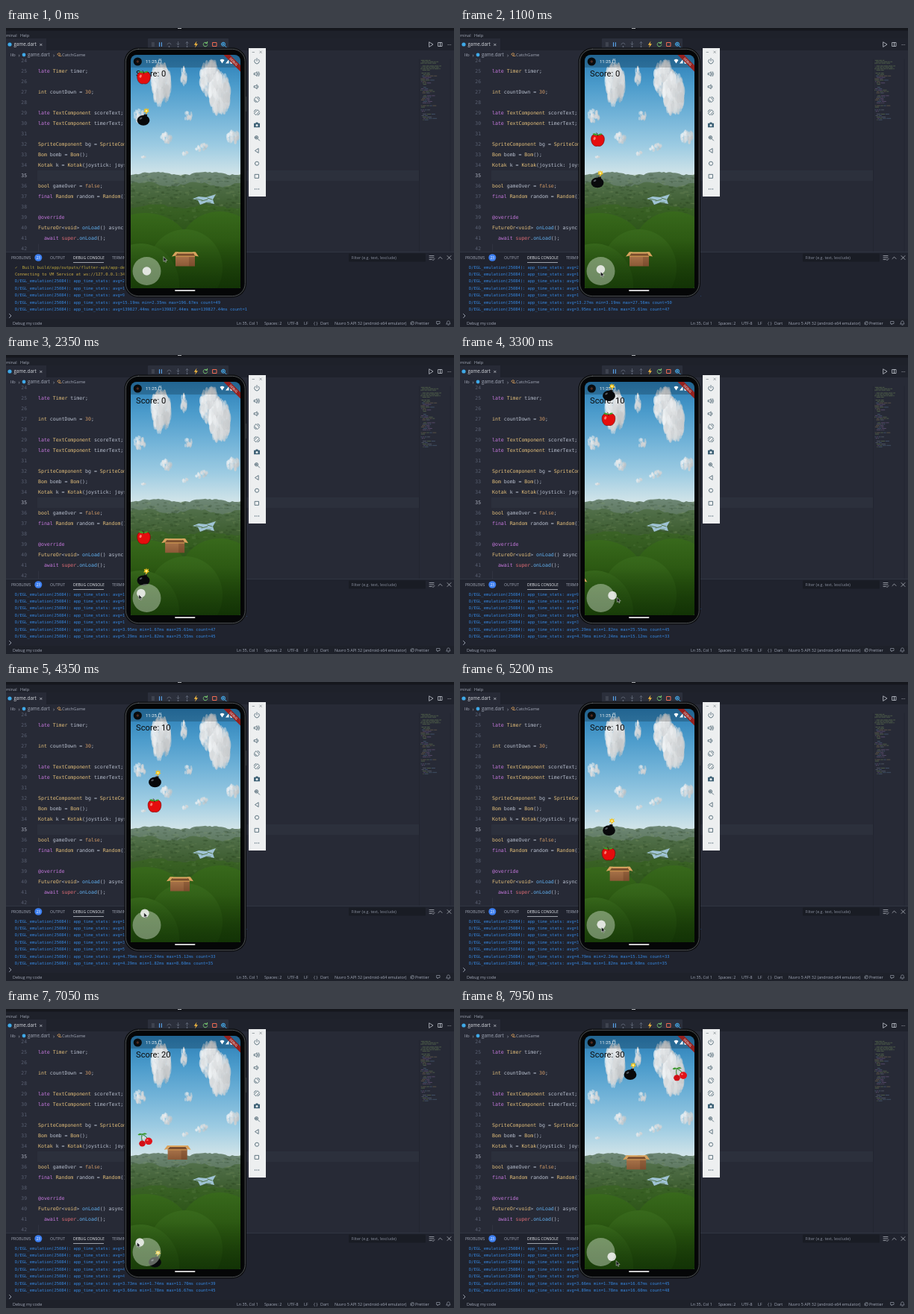
Recreate the animation shown at these times as an HTML page with a canvas. Size 600 by 401 pixels, loop 8000 ms.

```html
<!DOCTYPE html>
<html lang="en">
<head>
<meta charset="utf-8">
<title>Catch game</title>
<style>
html, body { margin: 0; width: 100%; height: 100%; overflow: hidden; background: #272a36; }
canvas { display: block; width: 600px; height: 401px; }
</style>
</head>
<body>
<canvas id="stage"></canvas>
<script>
const W = 600, H = 401, LOOP = 8000;
const UI = '"Open Sans", sans-serif', MONO = '"DejaVu Sans Mono", monospace', PHONE = 'Roboto, sans-serif';
const dpr = window.devicePixelRatio || 1;
const SCREEN = [167, 36, 147, 313];

function layer(canvas) {
  canvas.width = W * dpr;
  canvas.height = H * dpr;
  const ctx = canvas.getContext('2d');
  ctx.scale(dpr, dpr);
  ctx.lineCap = ctx.lineJoin = 'round';
  return ctx;
}
const stage = layer(document.getElementById('stage'));
const backdrop = document.createElement('canvas');
let c = layer(backdrop);

let seed = 7;
const rnd = () => (seed = (seed * 16807) % 2147483647) / 2147483647;

// Drawing helpers
function rect(x, y, w, h, fill, r = 0) {
  c.fillStyle = fill;
  c.beginPath();
  c.roundRect(x, y, w, h, r);
  c.fill();
}
function oval(x, y, rx, ry, fill, angle = 0) {
  c.fillStyle = fill;
  c.beginPath();
  c.ellipse(x, y, rx, ry, angle, 0, 7);
  c.fill();
}
function shape(d, fill) { c.fillStyle = fill; c.fill(new Path2D(d)); }
function line(d, color, width = 0.8) {
  c.strokeStyle = color;
  c.lineWidth = width;
  c.stroke(new Path2D(d));
}
function text(s, x, y, size = 5.4, color = '#a3a9b8', font = UI, align = 'left') {
  c.font = `${size}px ${font}`;
  c.fillStyle = color;
  c.textAlign = align;
  c.fillText(s, x, y + size * 0.36);
  return c.measureText(s).width;
}
function at(x, y, draw) {
  c.save();
  c.translate(x, y);
  draw();
  c.restore();
}
function vertical(y0, y1, ...colors) {
  const g = c.createLinearGradient(0, y0, 0, y1);
  colors.forEach((k, i) => g.addColorStop(i / (colors.length - 1), k));
  return g;
}

// Editor
const FIRST_LINE = 24;
const CODE = `
late Timer timer;

int countDown = 30;

late TextComponent scoreText;
late TextComponent timerText;

SpriteComponent bg = SpriteComponent();
Bom bomb = Bom();
Kotak k = Kotak(joystick: joystick);

bool gameOver = false;
final Random random = Random();

@override
FutureOr<void> onLoad() async {
  await super.onLoad();
`.split('\n');

function tokenColor(t) {
  if (/^(late|final|await|@override)$/.test(t)) return '#c678dd';
  if (t === 'super') return '#e06c75';
  if (t === 'onLoad') return '#61afef';
  if (/^(\d+|false)$/.test(t)) return '#d19a66';
  if (/^([A-Z]\w*|int|bool|void)$/.test(t)) return '#e5c07b';
  return '#b9c0cf';
}

function drawCode() {
  c.save();
  c.beginPath();
  c.rect(0, 41, W, 259);
  c.clip();
  CODE.forEach((source, i) => {
    const y = 43.2 + i * 14.05, n = FIRST_LINE + i;
    text(n, 28, y, 6.4, n === 35 ? '#b3b8c6' : '#596072', MONO, 'right');
    let x = 43;
    for (const t of source.match(/@?\w+|\W+/g) || []) x += text(t, x, y, 6.55, tokenColor(t), MONO);
  });
  c.restore();
}

function drawMinimap() {
  const inks = ['#8d6fa5', '#96805a', '#7e8595', '#5e7f9f', '#7b965f'];
  c.globalAlpha = 0.5;
  for (let y = 41; y < 124; y += 1.9) {
    if (rnd() < 0.2) continue;
    const end = 560 + rnd() * (y < 70 ? 24 : 14);
    for (let x = 555 + rnd() * 4, w; x < end; x += w + 0.8) {
      w = 1 + rnd() * 5;
      rect(x, y, w, 0.9, y < 62 ? inks[4] : inks[Math.floor(rnd() * 5)]);
    }
  }
  c.globalAlpha = 1;
  line('M553.5 42V300M595 42V300', '#22252f', 0.7);
}

function drawEditor() {
  rect(0, 0, W, H, '#272a36');
  rect(0, 0, W, 14, '#1e212a');
  rect(0, 0, W, 3.5, '#15171d');
  rect(230, 0, 5, 0.8, '#d8dade');
  rect(0, 14, W, 16, '#1f222c');
  rect(0, 14, 54, 16, '#272a36');
  text('minal', 0, 9.5, 5.6);
  text('Help', 19, 9.5, 5.6);
  oval(5, 22, 2.6, 2.6, '#3fa9e8');
  text('game.dart', 10.5, 22, 6.3, '#d7dae0');
  text('×', 44.5, 22, 8, '#c8ccd4');
  line('M567 19L572 22L567 25.2ZM579 19.5h5v5h-5zM581.5 19.5v5', '#c3c7d0');
  text('···', 591, 22, 7, '#c3c7d0');

  text('lib', 6, 36, 6);
  text('›', 16.5, 36, 7);
  oval(24, 36, 2.4, 2.4, '#3fa9e8');
  text('game.dart', 29, 36, 6.2);
  text('›', 63, 36, 7);
  line('M69 35l2-1.5 2 1.5-2 1.5zM71 37.5h3', '#e0a45c');
  text('CatchGame', 75, 36, 5.8);

  rect(42, 191, 511, 14, '#2c303c');
  line('M43.5 290V300', '#3a3f4d', 0.5);
  drawCode();
  drawMinimap();
}

function drawPanel() {
  rect(0, 300, W, 101, '#20232e');
  rect(0, 300, W, 0.7, '#363b49');
  text('PROBLEMS', 7, 308, 5.1);
  oval(43.3, 308, 5, 4.8, '#3d7ff0');
  text('23', 43.3, 308, 4.6, '#fff', UI, 'center');
  text('OUTPUT', 59, 308, 5.1);
  text('DEBUG CONSOLE', 90, 308, 5.1, '#eceff4');
  rect(90, 314, 41, 0.8, '#c8ccd4');
  text('TERMINAL', 142, 308, 5.1);
  rect(459, 302.5, 103, 11, '#191c24', 1);
  text('Filter (e.g. text, !exclude)', 462.5, 308, 5.4, '#868c9b');
  line('M567 305.5h6M567 308h6M567 310.5h3M571 310.5l1 1 2-2M579 309.5l2.5-2.5 2.5 2.5M591 305.5l5 5M596 305.5l-5 5', '#c3c7d0', 0.7);
  line('M4.5 383.5l2.5 2.5-2.5 2.5', '#b9c0cf');
  rect(0, 390, W, 11, '#1e212a');
  const status = { 'Debug my code': 9, 'Ln 35, Col 1': 309, 'Spaces: 2': 346, 'UTF-8': 377, 'LF': 399, '{ }': 412,
    'Dart': 421, 'Nuvro 5 API 32 (android-x64 emulator)': 440, 'Prettier': 548 };
  for (const s in status) text(s, status[s], 395.8);
  line('M542 397.5l3.5-3.5M542 395.8a2.2 2.2 0 1 0 4.4 0a2.2 2.2 0 1 0-4.4 0M577 393.5h4v3h-2l-1 1.5v-1.5h-1zM590 397h5c-1.2-1 0-4.2-2.5-4.2S591 396 590 397M592 398.3h1', '#a3a9b8', 0.6);
}

function drawDebugBar() {
  rect(190, 14, 108, 14, '#2b2f3b', 1);
  for (let i = 0; i < 6; i++) rect(195.5 + (i % 2) * 2, 19.5 + (i >> 1) * 2, 0.9, 0.9, '#848a98');
  line('M205.5 19.5v5M208.3 19.5v5', '#5aa7f0', 1.1);
  line('M216 22a2.6 2.6 0 0 1 5 0M230.5 18.5v4M228.8 21l1.7 1.7 1.7-1.7M242.5 23v-4.5M240.8 20.2l1.7-1.7 1.7 1.7', '#656c7b');
  for (let x = 218.5; x < 243; x += 12) oval(x, 25, 0.9, 0.9, '#656c7b');
  shape('M255.5 17.5L251.8 22.8H254.2L253 26.5L257 21.2H254.6Z', '#f4b83f');
  line('M269.2 20.2a2.8 2.8 0 1 0 .6 2.4M269.6 18.3v2.2h-2.2', '#73c26d', 1);
  line('M277 19.5h5v5h-5z', '#ef6b52', 1);
  line('M288.5 21.7a2.5 2.5 0 1 0 5 0a2.5 2.5 0 1 0-5 0M293 23.6l2 2M290 21.7h2M291 20.7v2', '#45b1f5', 1);
}

function drawEmulatorBar() {
  rect(325, 27, 23, 199, '#edeff0');
  line('M330 32.5h2.5M339.8 31l2.6 2.6M342.4 31l-2.6 2.6', '#6b747a', 0.6);
  const ink = '#536a76', speaker = 'M-3.5-1h1.5l2-2v6l-2-2h-1.5zM1.5-1.3q1 1.3 0 2.6';
  const camera = 'M-4-2.6h2l1-1.2h2l1 1.2h2v5.6h-8z';
  const icons = [
    'M-2.2-2.4a3.3 3.3 0 1 0 4.4 0M0-3.8v3.5',
    speaker + 'M2.4-3q2.6 3 0 6',
    speaker,
    'M-3.4-1l2.4-2.4 4.4 4.4-2.4 2.4zM1-3.6q2.5.4 2.8 2.6M-1 3.6q-2.5-.4-2.8-2.6',
    'M-3.4 1l4.4-4.4 2.4 2.4-4.4 4.4zM-1-3.6q-2.5.4-2.8 2.6M1 3.6q2.5-.4 2.8-2.6',
    camera,
    'M-2.8-.6a2.2 2.2 0 1 0 4.4 0a2.2 2.2 0 1 0-4.4 0M1.2 1.2l2.4 2.4M-1.6-.6h2M-.6-1.6v2',
    'M1.8-2.8l-4.4 2.8 4.4 2.8z',
    'M-2.6 0a2.6 2.6 0 1 0 5.2 0a2.6 2.6 0 1 0-5.2 0',
    'M-2.5-2.5h5v5h-5z',
    'M-2.5 0h0M0 0h0M2.5 0h0'
  ];
  icons.forEach((d, i) => at(336, 44.5 + i * 17.15, () => {
    if (d === camera) {
      shape(d, '#3f6276');
      oval(0, 0.2, 1.5, 1.5, '#e8eef0');
    } else line(d, ink, i === 10 ? 1.4 : 0.9);
  }));
}

// Game scenery
function cloud(x, y, rx, ry, tilt = 0) {
  at(x, y, () => {
    c.rotate(tilt);
    for (let n = 14 + rx * ry / 3; n > 0; n--) {
      const a = rnd() * 7, d = Math.sqrt(rnd()) * 0.85;
      const px = Math.cos(a) * d, py = Math.sin(a) * d;
      const shade = Math.round(218 - 20 * px - 12 * py + 30 * (rnd() - 0.5));
      oval(px * rx, py * ry, 0.7 + rx * 0.1, 1 + ry * 0.2, `rgba(${shade},${shade + 3},${shade + 5},.5)`);
    }
  });
}
function ridge(y, amp, step, fill) {
  c.beginPath();
  c.moveTo(160, 352);
  for (let x = 162; x < 320; x += step) c.lineTo(x, y + amp * Math.sin(x * 0.09 + y) + rnd() * amp);
  c.lineTo(320, 352);
  c.fillStyle = fill;
  c.fill();
}
function speckle(y0, y1, n, alpha) {
  while (n-- > 0) {
    const ink = rnd() < 0.6 ? '20,45,15' : '135,160,110';
    oval(167 + rnd() * 147, y0 + rnd() * (y1 - y0), 1 + rnd() * 2.5, 0.5 + rnd(), `rgba(${ink},${alpha})`);
  }
}
function drawScenery() {
  rect(...SCREEN, vertical(36, 198, '#2a7db5', '#4b9bcb', '#72b3d8', '#9ccbe2', '#d3e5e9'));
  cloud(207, 75, 15, 30);
  cloud(238, 65, 4.5, 14);
  cloud(274, 68, 16, 25);
  cloud(286, 88, 16, 29);
  cloud(179, 118, 9, 9);
  cloud(244, 118, 6, 7);
  cloud(304, 146, 9, 10);
  cloud(215, 147, 8.5, 8);
  cloud(262, 160, 9, 4.5, -0.35);
  cloud(240, 168, 4.5, 2.5, -0.4);
  cloud(185, 173, 4, 1.2);

  ridge(194, 2, 3, vertical(192, 235, '#6f8877', '#4f6b4c'));
  speckle(197, 214, 110, 0.17);
  ridge(208, 3, 4, vertical(206, 245, '#52704b', '#3a5a2c'));
  speckle(211, 238, 150, 0.17);
  shape('M250 229L258 226L268 227L281 223L277 230L279 236L268 234L260 237L257 231Z', '#9fc3d4');
  line('M254 229l9 2M262 232l8-2M270 228l6 2M268 234l6 0', '#56784f', 1);
  ridge(238, 2.5, 5, vertical(236, 280, '#3b6326', '#2b5218'));
  speckle(239, 262, 80, 0.13);
  const mound = (x, y, rx, ry) => oval(x, y, rx, ry, vertical(y - ry, y + ry, '#38691c', '#28530f', '#163505'));
  mound(186, 300, 62, 52);
  mound(286, 302, 56, 56);
  mound(240, 322, 50, 52);
  mound(180, 345, 52, 56);
  rect(167, 285, 147, 65, vertical(285, 350, 'rgba(15,45,5,0)', 'rgba(14,46,5,.6)'));

  rect(167, 36, 147, 17, 'rgba(0,0,0,.2)');
  text('11:25', 187, 45, 6, '#f4f6f7', PHONE);
  line('M204.8 43h3v4h-3zM205.3 42v-.5M207.3 42v-.5', '#f4f6f7', 0.7);
  shape('M286.5 43Q289.5 40.5 292.5 43L289.5 47.5ZM294 47.5L298.5 42V47.5ZM300.5 42.5h3v5.2h-3z', '#fff');
  at(304, 46, () => {
    c.rotate(Math.PI / 4);
    rect(-22, -4.2, 44, 6, '#94211f');
    text('DEBUG', 0, -1.1, 4.2, '#fff', PHONE, 'center');
  });
  oval(176.3, 45, 5.6, 5.6, '#090b0d');
  oval(176.3, 45, 1.7, 1.7, '#4d2b22');
}
function clipScreen() {
  c.beginPath();
  c.roundRect(...SCREEN, [8, 8, 2, 2]);
  c.clip();
}
function drawPhone() {
  rect(158.5, 26.5, 163.5, 335, '#0b0c0e', 19);
  c.beginPath();
  c.roundRect(160.3, 28.3, 160, 331.4, 17);
  c.strokeStyle = '#5d6265';
  c.lineWidth = 0.8;
  c.stroke();
  rect(162, 30, 156.5, 328, '#050607', 15);
  rect(321.4, 92, 1.4, 20, '#2f3336');
  c.save();
  clipScreen();
  drawScenery();
  c.restore();
  rect(226, 351.2, 27.5, 1.7, '#e8e8e8', 0.8);
}

// Sprites
function apple() {
  const body = 'M0-6C4-9.5 9-7 8.8-1C8.6 5 5 9.5 0 8C-5 9.5-8.6 5-8.8-1C-9-7-4-9.5 0-6Z';
  shape(body, '#e50d0d');
  line(body, '#7c0808', 0.7);
  line('M0-5.5Q0-8.5-1.5-9.5', '#4a2a10', 1);
  shape('M0-6.5Q-3-10-7-8.5Q-5-5 0-6.5ZM0-6.5Q2-9.5 6-8.5Q4-5.5 0-6.5Z', '#3e9c27');
  oval(-4.3, -2, 1.5, 2.2, '#ff7b70', 0.4);
}
function cherry() {
  line('M-3.5 4Q-5-3-4-7.5M5 0Q1-6-4-7.5', '#2f7d24', 1);
  shape('M-4-7.5Q-7-10-9.5-6.5Q-6-5-4-7.5ZM-4-7.5Q0-10.5 3-7.5Q-1-6-4-7.5Z', '#3b9a2d');
  oval(-3.5, 5.2, 4.3, 4, '#d20f16');
  oval(5, 2, 5, 4.8, '#e0141a');
  oval(3.4, 0.4, 1.2, 0.9, '#ff8c88');
}
function bomb() {
  line('M3-6Q3-9 4-11', '#c9a05a', 1.2);
  rect(0.8, -8, 4.2, 3, '#14161a', 0.5);
  oval(0, 0, 8.4, 6.9, '#08090b');
  oval(-3.4, -2.6, 2, 1.1, '#54585f', -0.5);
  shape('M4-17L4.8-14.5L7.3-16L6.4-13.3L8-11.7L5.6-11L4.6-8.8L3-11L.2-10.8L1.6-13L.8-15.5L3.2-14.7Z', '#f6c51e');
  oval(4, -12.6, 1.2, 1.2, '#fff3a0');
}
function box() {
  rect(-13, -4.5, 26, 14, vertical(-5, 10, '#a9744a', '#8a5836'));
  shape('M5-4.5H13V9.5H5Z', 'rgba(70,35,15,.22)');
  shape('M-13-4.5L-9-9H10L13-4.5Z', '#7a4d2d');
  shape('M-13-4.5L-18-3.6L-13.5-9.5H-9ZM13-4.5L18-3.6L14-9.5H10Z', '#d9a25d');
  shape('M-13.5-9.5H14L10-7.5H-9.5Z', '#e0ab65');
  rect(-13, -4.5, 26, 1.5, '#c58c4e');
}
function cursor() {
  const arrow = 'M0 0V6.2L1.5 4.9L2.6 7.2L3.7 6.7L2.6 4.5H4.5Z';
  shape(arrow, '#15171a');
  line(arrow, '#e8e8e8', 0.5);
}

// Motion: everything falls at one speed; a caught fruit is replaced at the top.
const SPEED = 0.076;
const FRUITS = [
  { born: -270, x: 184.5, draw: apple },
  { born: 2770, x: 199, draw: apple },
  { born: 5350, x: 186, draw: cherry },
  { born: 7410, x: 294, draw: cherry }
];
const BOMB_X = [184, 199.5, 228], BOMB_PERIOD = 4210, BOMB_LEAD = 970;

// Turning points of the box: time, x, y
const ROUTE = [[1150, 240, 310], [2000, 238, 266], [2650, 216, 247], [3220, 144, 310], [4100, 236, 289],
  [4600, 230, 253], [5000, 213, 258], [5300, 214, 257], [6000, 269.5, 248], [6200, 269.5, 248],
  [7150, 225, 186], [7450, 203, 192], [8100, 246, 210]];
const STICK = { x: 188.5, y: 326, reach: 16 };

function boxAt(t) {
  const i = ROUTE.findIndex(p => p[0] > t);
  if (i === 0) return ROUTE[0].slice(1);
  const [t0, x0, y0] = ROUTE[i - 1], [t1, x1, y1] = ROUTE[i], k = (t - t0) / (t1 - t0);
  return [x0 + (x1 - x0) * k, y0 + (y1 - y0) * k];
}
// The stick leans the way the box travels, further the faster it goes.
function stickLean(t) {
  const span = 80, [x0, y0] = boxAt(t - span), [x1, y1] = boxAt(t + span);
  const dx = (x1 - x0) * 1.4, dy = (y1 - y0) * 1.4;
  const limit = Math.min(1, STICK.reach / (Math.hypot(dx, dy) || 1));
  return [dx * limit, dy * limit];
}

// Console: one more line of timing about every second
const LOG = [
  ['✓  Built build/app/outputs/flutter-apk/app-debug.apk.', '#b9a53c'],
  ['Connecting to VM Service at ws://127.0.0.1:34567/ws', '#c3a644'],
  ...['2.88ms', '11.42ms', '9.36ms',
    '15.19ms min=2.35ms max=196.67ms count=49',
    '139827.44ms min=139827.44ms max=139827.44ms count=1',
    '13.27ms min=3.19ms max=27.56ms count=50',
    '3.95ms min=1.67ms max=25.61ms count=47',
    '5.29ms min=1.82ms max=25.55ms count=45',
    '4.79ms min=2.24ms max=15.12ms count=33',
    '4.29ms min=1.82ms max=8.60ms count=35',
    '3.73ms min=1.74ms max=11.70ms count=39',
    '3.66ms min=1.78ms max=16.67ms count=45',
    '4.89ms min=1.78ms max=16.60ms count=48'
  ].map(avg => ['D/EGL_emulation(25084): app_time_stats: avg=' + avg, '#3587e0'])
];
function drawConsole(t) {
  const first = Math.floor((t + 1000) / 1050);
  LOG.slice(first, first + 7).forEach(([s, color], i) => text(s, 12, 320.6 + i * 9.4, 5.45, color, MONO));
}

function drawGame(t) {
  const caught = FRUITS.filter(f => f.born <= t).length - 1, fruit = FRUITS[caught];
  const bombAge = t + BOMB_LEAD;
  const [leanX, leanY] = stickLean(t);
  c.save();
  clipScreen();
  text('Score: ' + caught * 10, 174, 61, 11.2, '#0b0b0b', PHONE);
  at(BOMB_X[Math.floor(bombAge / BOMB_PERIOD)], 50 + (bombAge % BOMB_PERIOD) * SPEED, bomb);
  at(...boxAt(t), box);
  at(fruit.x, 46 + (t - fruit.born) * SPEED, fruit.draw);
  oval(STICK.x, STICK.y, 19, 19, 'rgba(225,235,220,.42)');
  oval(STICK.x + leanX, STICK.y + leanY, 5.8, 5.8, 'rgba(245,245,245,.85)');
  c.restore();

  // The pointer comes in from the upper right, then leads the stick.
  const away = Math.max(0, 1 - t / 700);
  at(STICK.x + leanX * 1.4 + 22.5 * away, STICK.y + 4 + leanY * 1.3 - 23 * away, cursor);
}

drawEditor();
drawPanel();
drawDebugBar();
drawPhone();
drawEmulatorBar();

// The phone covers the console, so the log shows only around it.
const beside = new Path2D();
beside.rect(0, 315, 158.5, 66);
beside.rect(322, 315, 278, 66);
beside.rect(158.5, 361.5, 163.5, 20);

c = stage;
const start = performance.now();
function frame() {
  const t = Math.max(0, performance.now() - start) % LOOP;
  c.drawImage(backdrop, 0, 0, W, H);
  c.save();
  c.clip(beside);
  drawConsole(t);
  c.restore();
  drawGame(t);
  requestAnimationFrame(frame);
}
frame();
</script>
</body>
</html>
```
